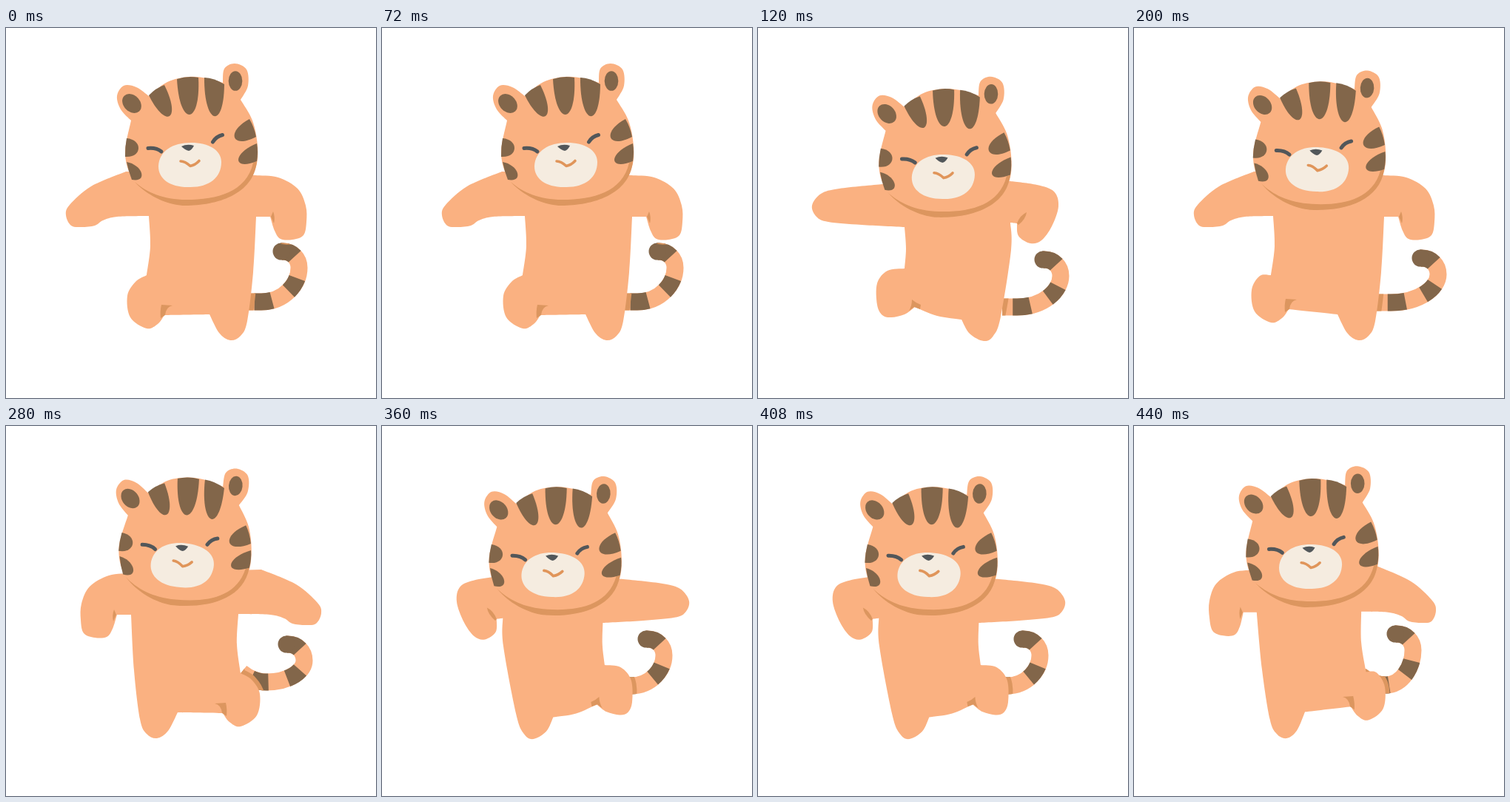
These frames come from a looping animation (500x500 px, 0.48 s). An HTML page:

```html
<!DOCTYPE html>
<html lang="en">
<head>
<meta charset="utf-8">
<title>Dancing tiger</title>
<style>
  html, body { margin: 0; width: 100%; height: 100%; overflow: hidden; background: #fff; }
  svg { display: block; width: 100vw; height: 100vh; }
  .fur { fill: #fab181; }
  .shade { fill: #dc965f; }
  .stripe { fill: #82664a; }
  .cream { fill: #f5ece0; }
  .ink { fill: #52575a; }
  .line { fill: none; stroke-linecap: round; stroke-linejoin: round; }
  .mouth { stroke: #e0955a; stroke-width: 3.6; }
  .eye { stroke: #52575a; stroke-width: 5; }
  .tail { fill: none; stroke: #fab181; stroke-width: 23; }
  .bands { stroke: #82664a; stroke-dasharray: 20 31 21 26 24 200; }
  .edge { fill: none; stroke: #dc965f; stroke-width: 12; }
</style>
</head>
<body>
<svg id="stage" viewBox="0 0 500 500">
  <defs>
    <g id="head">
      <path id="skull" class="fur"/>
      <path class="shade" d="M174 208C195 231 225 240 242 240C285 240 335 225 339 180L334 182C325 222 285 232 244 232C212 232 190 222 174 208Z"/>
      <ellipse class="stripe" cx="170" cy="102" rx="14.5" ry="11" transform="rotate(45 170 102)"/>
      <ellipse class="stripe" cx="310" cy="71.5" rx="9.3" ry="13.3"/>
      <g id="marks" class="stripe"></g>
      <path class="cream" d="M206 187C207 166 225 155 250 155C274 155 291 165 291 181C291 202 275 215 249 215C222 216 206 204 206 187Z"/>
      <path class="line mouth" d="M236 180Q242 180 249 186.500Q256 185 261 179.500"/>
      <path class="ink" d="M237 160Q245 156 254 159Q251 165 247 166Q242 165 237 160Z"/>
      <path class="line eye" d="M192 162.500Q203 161.500 210 167"/>
      <path class="line eye" d="M279.500 154Q284 146.500 292.500 144.500"/>
    </g>
  </defs>
</svg>
<script>
const LOOP = 480;
const stage = document.getElementById("stage");

function make(tag, attrs, parent) {
  const el = document.createElementNS("http://www.w3.org/2000/svg", tag);
  for (const key in attrs) el.setAttribute(key, attrs[key]);
  return parent.appendChild(el);
}

const parse = run => run.trim().split(" ").map(p => p.split(",").map(Number));
const shift = (run, dx, dy) => parse(run).map(([x, y]) => `${x + dx},${y + dy}`).join(" ");

// Catmull-Rom curve through each run of points; "|" marks a corner
function outline(text) {
  let last, d = "";
  for (const run of text.split("|")) {
    const pts = parse(run);
    if (last) pts.unshift(last);
    else d = "M" + pts[0];
    for (let i = 0; i < pts.length - 1; i++) {
      const b = pts[i], c = pts[i + 1];
      const a = pts[i - 1] || b, e = pts[i + 2] || c;
      const c1 = b.map((v, k) => v + (c[k] - a[k]) / 6);
      const c2 = c.map((v, k) => v - (e[k] - b[k]) / 6);
      d += `C${c1} ${c2} ${c}`;
    }
    last = pts[pts.length - 1];
  }
  return d + "Z";
}

// Rounded stripe growing from the edge a-b towards its tip
function lobe(text) {
  const [a, b, tip] = parse(text);
  const mid = a.map((v, k) => (v + b[k]) / 2);
  const reach = (p, f) => p.map((v, k) => v + (tip[k] - mid[k]) * f);
  return `M${a}C${reach(a, 4 / 3)} ${reach(b, 4 / 3)} ${b}Q${reach(mid, -0.08)} ${a}Z`;
}

// The tail hooks round from its tip, then sweeps to its base
function tailPath([x, y], [bx, by], flip) {
  const rx = x + 24, my = y + 22;
  return `M${x} ${y}C${x + 15} ${y - 1} ${rx} ${y + 10} ${rx} ${my}` +
    `C${rx} ${my + 0.45 * (by - my)} ${bx + 0.63 * (rx - bx)} ${by} ${bx} ${by}` +
    (flip ? "q-18 0 -34 -13" : "h-20");
}

// Arms hanging; dx and dy move the lifted leg
const low = (dx, dy) => ({
  body: `162,194 115,214 86,239 81,253 88,267 102,269 120,267 131,260 150,255 ${193 + dx},254
    | ${195 + dx},295 ${190 + dx},334
    | ${shift("175,343 164,362 168,391 190,406 205,400 214,388", dx, dy)} | 275,387
    | 288,412 303,422 317,416 326,396 334,330 338,255 | 357,255
    | 363,274 371,285 387,286 402,280 406,262 405,240 394,217 368,202 337,199`.replace(/\s+/g, " "),
  knee: `translate(${dx} ${dy})`,
  fold: "M210 374L225 375Q216 377 215 388L209 392Q208 382 210 374Z",
  pit: "M358 255L361 248Q364 256 362 264Z"
});

// Arm thrown out sideways
const high = {
  body: "168,211 110,217 85,224 73,240 79,255 95,262 140,266 198,269 | 200,298 198,325 " +
    "| 175,328 161,345 161,374 168,388 180,391 198,387 212,377 | 242,389 275,394 " +
    "| 286,413 305,423 318,416 328,390 342,300 341,263 | 350,264 " +
    "| 352,281 368,291 383,287 397,268 406,241 400,221 377,212 341,207",
  knee: "",
  fold: "M208 367Q214 372 220 374L219 380L211 377L204 382Q208 376 208 367Z",
  pit: "M350 264Q354 253 363 249Q362 258 352 266Z"
};

// The second half of the dance mirrors the first
const mirror = "matrix(-1 0 0 1 507 0)";
const lean = "matrix(-.943 0 .045 1.02 473 -8.4)";

// head: x, y, turn
const poses = [
  { start: 0, head: [0, 0, 0], shape: low(0, 0), tip: [372, 302], base: [345, 370] },
  { start: 120, head: [2.5, 16, 1.6], shape: high, tip: [385, 313], base: [350, 377] },
  { start: 200, head: [0.3, 6, 3.1], shape: low(-5, -8), tip: [387, 311], base: [347, 371] },
  { start: 280, head: [-8, 3, 5.5], shape: low(0, 0), flip: mirror, tip: [379, 295], base: [352, 346] },
  { start: 360, head: [-16, 16, 3.5], shape: high, flip: lean, tip: [357, 288], base: [336, 351] },
  { start: 440, head: [-9.5, 5, 1.1], shape: low(-5, -8), flip: lean, tip: [353, 281], base: [340, 350] }
];

document.getElementById("skull").setAttribute("d", outline(
  "169,125 155,110 150,92 159,78 176,80 193,92 | 218,73 247,66 272,68 293,74 " +
  "| 295,55 309,48 325,56 327,78 317,97 " +
  "| 333,125 340,160 337,190 318,219 284,236 242,240 200,229 172,205 161,170 169,125"));

const marks = document.getElementById("marks");
for (const m of [
  "193,91 214,77 221,119", "231,69 260,67 248,117", "268,67 295,76 281,119",
  "163,149 161,174 179,163", "163,181 170,205 183,196",
  "329,123 338,147 309,148", "339,156 339,180 314,178"
]) make("path", { d: lobe(m) }, marks);

poses.forEach((pose, i) => {
  const { shape, tip, flip = "" } = pose;
  const [x, y, turn] = pose.head;
  const g = make("g", { opacity: 0 }, stage);
  const tail = tailPath(tip, pose.base, flip);
  const body = outline(shape.body);

  make("path", { class: "tail", d: tail }, g);
  make("path", { class: "tail bands", d: tail }, g);
  make("circle", { class: "stripe", cx: tip[0], cy: tip[1], r: 11.5 }, g);

  // Shadow of the body, only where the tail meets it
  const mask = make("mask", { id: "tail" + i, maskUnits: "userSpaceOnUse", x: 0, y: 0, width: 500, height: 500 }, g);
  make("path", { class: "tail", d: tail, style: "stroke: #fff" }, mask);
  const edge = make("g", { mask: `url(#tail${i})` }, g);
  make("path", { class: "edge", d: body, transform: flip }, edge);

  const torso = make("g", { transform: flip }, g);
  make("path", { class: "fur", d: body }, torso);
  make("path", { class: "shade", d: shape.fold, transform: shape.knee }, torso);
  make("path", { class: "shade", d: shape.pit }, torso);
  make("use", { href: "#head", transform: `translate(${x} ${y}) rotate(${turn} 246 161)` }, g);

  const shown = poses.map((p, j) => ({ offset: p.start / LOOP, opacity: j === i ? 1 : 0, easing: "step-end" }));
  g.animate([...shown, { offset: 1, opacity: 0 }], { duration: LOOP, iterations: Infinity });
});
</script>
</body>
</html>
```
